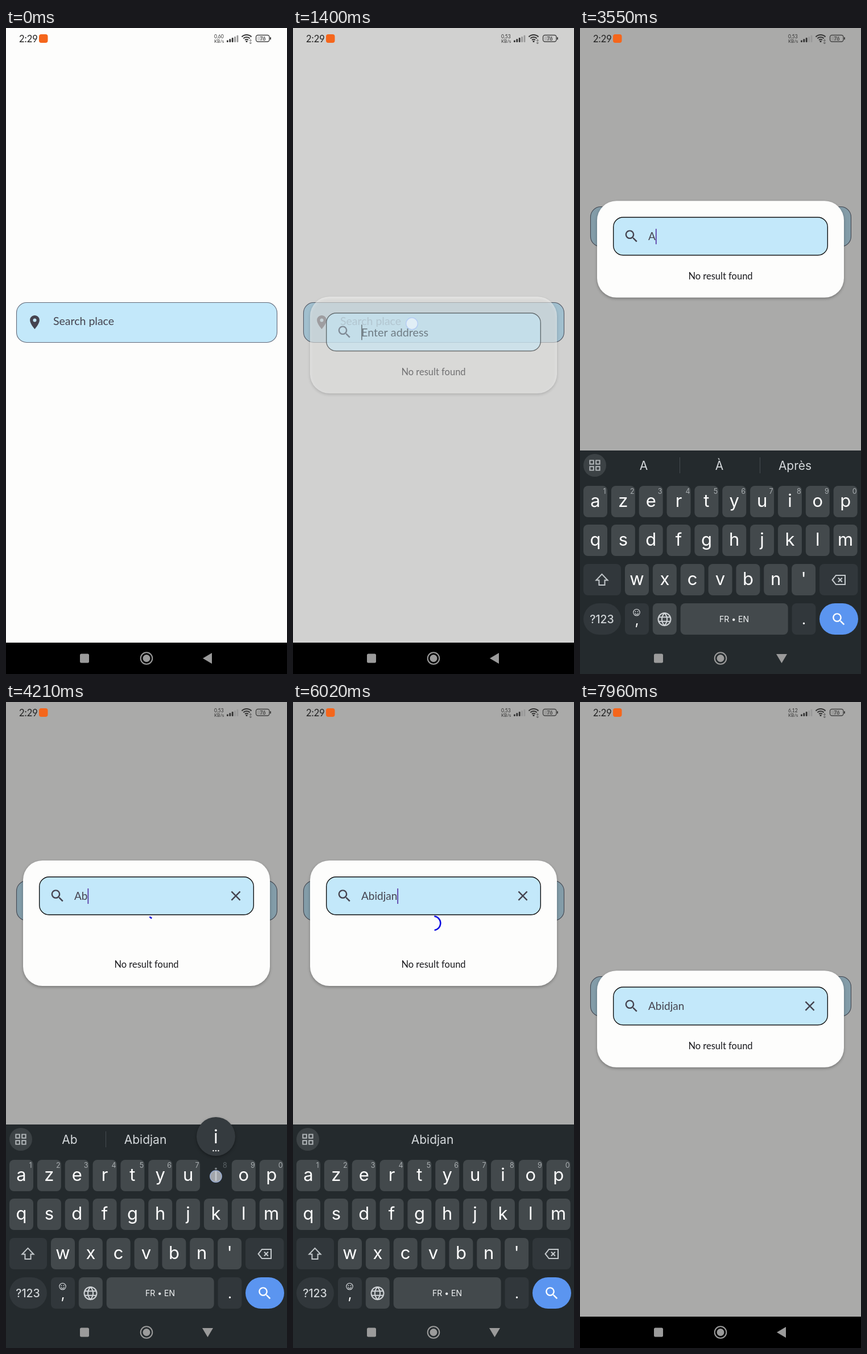
Recreate the animation shown at these times as an HTML page with a canvas. Size 494 by 1133 pixels, loop 8000 ms.

```html
<!DOCTYPE html>
<html lang="en">
<head>
<meta charset="utf-8">
<title>Place search</title>
<style>
html, body { margin: 0; width: 100%; height: 100%; overflow: hidden; background: #fdfdfc; }
canvas { display: block; }
</style>
</head>
<body>
<canvas id="stage" width="494" height="1133"></canvas>
<script>
const c = document.getElementById('stage').getContext('2d');
const LOOP = 8000, HAND = 'Lato, sans-serif', UI = 'Inter, sans-serif';
const INK = '#45434f', SKY = '#c3e8fa', PAPER = '#fdfdfc', KEY = '#43494c', DARK = '#31373b', BOARD = '#242a2d', ICON = '#b4b9bc';

// Time helpers
const ramp = (t, a, b) => Math.max(0, Math.min(1, (t - a) / (b - a)));
const ease = p => 1 - (1 - p) ** 3;
const smooth = p => p * p * (3 - 2 * p);

// Drawing helpers
function box(x, y, w, h, r, fill, stroke, lw = 1) {
  c.beginPath();
  c.roundRect(x, y, w, h, r);
  if (fill) { c.fillStyle = fill; c.fill(); }
  if (stroke) { c.strokeStyle = stroke; c.lineWidth = lw; c.stroke(); }
}
function disc(x, y, r, fill, stroke, lw = 1) {
  c.beginPath();
  c.arc(x, y, r, 0, 7);
  if (fill) { c.fillStyle = fill; c.fill(); }
  if (stroke) { c.strokeStyle = stroke; c.lineWidth = lw; c.stroke(); }
}
function txt(s, x, y, size, color, align = 'left', family = HAND, weight = 400) {
  c.font = `${weight} ${size}px ${family}`;
  c.textAlign = align;
  c.fillStyle = color;
  c.fillText(s, x, y);
}
// Icons live on a 24 x 24 grid and are centred on x, y
function icon(path, x, y, scale, color, lw) {
  c.save();
  c.translate(x, y);
  c.scale(scale, scale);
  c.translate(-12, -12);
  c.fillStyle = c.strokeStyle = color;
  c.lineWidth = lw;
  if (lw) c.stroke(path); else c.fill(path, 'evenodd');
  c.restore();
}
const ring = (x, y, r) => `M${x - r} ${y}a${r} ${r} 0 1 0 ${2 * r} 0a${r} ${r} 0 1 0 ${-2 * r} 0z`;
const P = s => new Path2D(s);
const PIN = P('M12 2C8.1 2 5 5.1 5 9c0 5.25 7 13 7 13s7-7.75 7-13c0-3.9-3.1-7-7-7z' + ring(12, 9, 2.5));
const LENS = P('M15.5 14h-.8l-.3-.3C15.4 12.6 16 11.1 16 9.5 16 5.9 13.1 3 9.5 3S3 5.9 3 9.5 5.9 16 9.5 16c1.6 0 3.1-.6 4.2-1.6l.3.3v.8l5 5 1.5-1.5zM9.5 14C7 14 5 12 5 9.5S7 5 9.5 5 14 7 14 9.5 12 14 9.5 14z');
const CROSS = P('M5.7 5.7l12.6 12.6M18.3 5.7L5.7 18.3');
const SHIFT = P('M12 3L21 12.5H16.5V20H7.5V12.5H3Z');
const ERASE = P('M8 5H22V19H8L2.5 12ZM11.5 9l6 6m0-6l-6 6');
const GLOBE = P(ring(12, 12, 9) + 'M3.5 9h17M3.5 15h17M12 3c-5 5.500-5 12.500 0 18c5-5.500 5-12.500 0-18');
const GRID = P('M4 4h6v6h-6zM14 4h6v6h-6zM4 14h6v6h-6zM14 14h6v6h-6z');
const CLIP = P('M4 4.500H20V21H4ZM8 4V7.500H16V4M8 11.500h8M8 14.500h8M8 17.500h5M10 3h4');
const STICKER = P('M5 3H19L21 5V14L14 21H5L3 19V5ZM21 14H14V21M8 9h1M15 8h2M7 13q3 4 7 1');
const PALETTE = P('M12 3c-5 0-9 4-9 9s4 9 9 9c.8 0 1.500-.7 1.500-1.500 0-.4-.2-.7-.4-1-.2-.3-.4-.6-.4-1 0-.8.7-1.500 1.500-1.500H16c2.800 0 5-2.200 5-5 0-4.400-4-8-9-8z'
  + ring(6.5, 11.5, 1.5) + ring(9.5, 7.5, 1.5) + ring(14.5, 7.5, 1.5) + ring(17.5, 11.5, 1.5));

// Typed letters: finger down, finger up
const TAPS = [['A', 3220, 3310], ['b', 3760, 3850], ['i', 4150, 4240], ['d', 4440, 4530], ['j', 4730, 4820], ['a', 4960, 5060], ['n', 5660, 5760]];
const PLACES = ['Alberta, Canada', 'Abia State, Nigeria', 'Abkhazia, Georgia', 'Stockholm County, Sweden'];
const ROWS = [['azertyuiop', 6, 803], ['qsdfghjklm', 6, 871], ["wxcvbn'", 79, 940]];
const KEYS = ROWS.flatMap(([s, x, y]) => [...s].map((ch, i) => ({ ch, x: x + i * 48.85, y })));

function state(t) {
  const done = TAPS.filter(k => t >= k[2]);
  const text = done.map(k => k[0]).join('');
  const since = t - (done.length ? done[done.length - 1][2] : 980);
  return {
    text,
    tap: TAPS.find(k => t >= k[1] && t < k[2]),
    kb: ease(ramp(t, 1420, 1560)) * (1 - smooth(ramp(t, 7500, 7760))),
    shade: ramp(t, 1310, 1480),
    cursor: t < 7420 && since % 1000 < 500,
    results: t >= 6380 && t < 7560,
    busy: t >= 3850 && t < 6380,
    focus: t >= 1450 && t < 2310,
    speed: t < 990 ? '0,60' : t < 6930 ? '0,53' : '6,12',
    turn: smooth(ramp(t, 1690, 1890)) - smooth(ramp(t, 7420, 7620))
  };
}

function page(s) {
  const y = 481 - 168 * s.kb;
  box(18.5, y + .5, 458, 70, 18, SKY, s.focus ? '#6750a4' : '#626978', s.focus ? 2 : 1.1);
  icon(PIN, 50.5, y + 35, 1.2, INK);
  txt('Search place', 83, y + 40, 19.5, INK);
  c.fillStyle = `rgba(0,0,0,${.33 * s.shade})`;
  c.fillRect(0, 0, 494, 1133);
}

function statusBar(s) {
  txt('2:29', 23, 25, 16.5, '#222');
  box(58, 11, 15.5, 15, 4, '#f5661c');
  txt(s.speed, 366, 18, 8.5, '#333');
  txt('KB/s', 366, 26, 8, '#333');
  for (let i = 0; i < 5; i++)
    box(388 + i * 4.4, 21.5 - i * 2.2, 2.8, 3.5 + i * 2.2, 1, i < 3 ? '#333' : '#999');
  c.strokeStyle = '#333';
  c.lineWidth = 2;
  for (const r of [4, 8, 12]) {
    c.beginPath();
    c.arc(423, 24, r, -2.36, -.78);
    c.stroke();
  }
  disc(423, 23.5, 1.6, '#333');
  txt('↕', 427, 26, 7, '#333', 'left', UI);
  box(439.5, 12.5, 23.5, 11.5, 3.5, null, '#444', 1.4);
  box(441.5, 14.5, 15, 7.5, 2, 'rgba(110,110,110,.25)');
  box(464, 16, 2, 4.5, 1, '#444');
  txt('76', 451.5, 21.5, 8.5, '#333', 'center');
}

function spinner(t, y) {
  const turns = (t - 2992) / 1332, p = turns % 1;
  const rad = Math.PI / 180;
  const head = 290 * smooth(Math.min(1, 2 * p)), tail = 290 * smooth(Math.max(0, 2 * p - 1));
  const base = 342 + 286 * p + 216 * (Math.floor(turns) - 1);
  c.beginPath();
  c.arc(247, y, 12.3, (base + tail) * rad, (base + Math.max(head, tail + 2)) * rad);
  c.strokeStyle = '#0808e0';
  c.lineWidth = 2.6;
  c.stroke();
}

function dialog(s, t) {
  if (!s.shade) return;
  const h = s.results ? 366 : s.busy ? 220 : 169.5;
  const y = 556 - 168 * s.kb - h / 2;
  c.save();
  c.globalAlpha = s.shade;
  c.shadowColor = 'rgba(0,0,0,.3)';
  c.shadowBlur = 5;
  c.shadowOffsetY = 2;
  box(30, y, 434, h, 34, PAPER);
  c.shadowColor = 'transparent';
  box(58.7, y + 28.7, 376.6, 66.6, 17, SKY, '#111', 1.4);
  icon(LENS, 90.5, y + 62, 1.2, INK);
  if (s.text) txt(s.text, 120, y + 69, 19, INK);
  else txt('Enter address', 120, y + 69.5, 19.8, '#26282c');
  if (s.cursor) {
    const x = 120 + (s.text && c.measureText(s.text).width);
    box(x, y + 49, 1.8, 27, 0, s.text ? '#5b3fa8' : '#333');
  }
  if (s.text.length > 1) icon(CROSS, 404, y + 62, 1.2, INK, 2);
  if (s.busy) spinner(t, y + 110);
  if (s.results) PLACES.forEach((name, i) => {
    const cy = y + 127 + i * 60.7;
    txt(name, 77, cy + 6, 16, '#18181c');
    disc(396.7, cy, 10.7, null, INK, 2.2);
  });
  else txt('No result found', 247, y + h - 32, 16.5, '#18181c', 'center');
  c.restore();
}

function gear(x, y) {
  disc(x, y, 6, null, ICON, 5);
  for (let i = 0; i < 8; i++) {
    c.save();
    c.translate(x, y);
    c.rotate(i * Math.PI / 4);
    box(-2.3, -10.6, 4.6, 4, 1, ICON);
    c.restore();
  }
}

function toolbar(s) {
  disc(26, 767, 20, '#3c4245');
  icon(GRID, 26, 767, 1.08, ICON, 1.8);
  if (!s.text) {
    icon(STICKER, 100, 767, 1.2, '#596064', 2);
    txt('GIF', 173, 773, 17, '#596064', 'center', UI, 800);
    icon(CLIP, 247, 767, 1.12, ICON, 2);
    gear(320, 767);
    icon(PALETTE, 393.5, 767, 1.2, ICON);
    return;
  }
  const words = s.text === 'A' ? ['A', 'À', 'Après'] : s.text === 'Abidjan' ? ['', s.text] : [s.text, 'Abidjan'];
  words.forEach((w, i) => txt(w, [112, 245, 378][i], 775, 21, '#d5d9dc', 'center', UI));
  if (words[0]) box(175, 753, 1, 28, 0, '#454b4f');
  if (words[2]) box(316, 753, 1, 28, 0, '#454b4f');
}

function keyboard(s) {
  if (!s.kb) return;
  c.save();
  c.beginPath();
  c.rect(0, 0, 494, 1078);
  c.clip();
  c.translate(0, 337 * (1 - s.kb));
  c.fillStyle = BOARD;
  c.fillRect(0, 741, 494, 392);
  toolbar(s);
  const upper = !s.text;
  const label = ch => upper ? ch.toUpperCase() : ch;
  const held = s.tap && KEYS.find(k => k.ch === s.tap[0].toLowerCase());
  KEYS.forEach((k, i) => {
    const down = k === held;
    if (!down) box(k.x, k.y, 42, 55, 8, KEY);
    txt(label(k.ch), k.x + 21, k.y + (upper ? 38.5 : 36.5), 31, down ? '#7d8387' : '#fff', 'center', UI);
    if (i < 10) txt((i + 1) % 10, k.x + 37, k.y + 14, 12.5, down ? '#596064' : '#a9aeb1', 'center', UI);
  });
  box(6, 940, 66, 55, 8, DARK);
  icon(SHIFT, 38.5, 968, 1.12, '#c3c8cb', upper ? 0 : 1.8);
  box(421, 940, 67.5, 55, 8, DARK);
  icon(ERASE, 454.5, 968, 1.15, '#c3c8cb', 1.8);
  box(6, 1009, 66, 55, 27.5, DARK);
  txt('?123', 38.5, 1043.5, 19.5, '#d0d4d7', 'center', UI, 500);
  box(79, 1009, 42, 55, 8, DARK);
  disc(99.5, 1025, 5.7, null, '#d0d4d7', 1.2);
  disc(97.5, 1023.5, .9, '#d0d4d7');
  disc(101.5, 1023.5, .9, '#d0d4d7');
  c.beginPath();
  c.arc(99.5, 1025.5, 3, .2, 2.9);
  c.stroke();
  txt(',', 100, 1047, 25, '#fff', 'center', UI);
  box(127.8, 1009, 42, 55, 8, KEY);
  icon(GLOBE, 148.5, 1037, 1.22, '#d0d4d7', 1.6);
  box(176.7, 1009, 189, 55, 8, KEY);
  txt('FR • EN', 271, 1041.500, 14, '#f2f4f5', 'center', UI);
  box(372.5, 1009, 42, 55, 8, DARK);
  txt('.', 393.5, 1046, 26, '#fff', 'center', UI);
  box(421, 1009, 68, 55, 27.5, '#5b95f0');
  icon(LENS, 455, 1037, 1.2, '#fff');
  if (held) {
    const x = Math.max(34, held.x + 21), y = held.y - 41;
    c.save();
    c.shadowColor = 'rgba(0,0,0,.35)';
    c.shadowBlur = 5;
    c.shadowOffsetY = 2;
    disc(x, y, 34, '#353b3f');
    c.restore();
    txt(label(held.ch), x, y + 12, 32, '#fff', 'center', UI);
    if ('ain'.includes(held.ch)) for (const d of [-4.5, 0, 4.5]) disc(x + d, y + 25, 1.2, '#fff');
    touch(held.x + 21, held.y + 29, 1);
  }
  c.restore();
}

function touch(x, y, alpha) {
  c.save();
  c.globalAlpha = alpha;
  disc(x, y, 10.3, 'rgba(245,248,255,.6)', 'rgba(170,195,245,.75)', 1.3);
  c.restore();
}

function navBar(s) {
  c.fillStyle = s.kb ? BOARD : '#000';
  c.fillRect(0, 1078, 494, 55);
  const grey = '#9b9b9b';
  box(130, 1097.5, 16, 16, 2.5, grey);
  disc(247, 1105.5, 10.3, null, grey, 2);
  disc(247, 1105.5, 6.5, grey);
  c.save();
  c.translate(354.5, 1105.5);
  c.rotate(-s.turn * Math.PI / 2);
  c.fillStyle = grey;
  c.fill(P('M-8.500 0L7.500-9.500V9.500Z'));
  c.restore();
}

function draw(now) {
  const t = now % LOOP, s = state(t);
  c.fillStyle = PAPER;
  c.fillRect(0, 0, 494, 1133);
  page(s);
  statusBar(s);
  dialog(s, t);
  keyboard(s);
  navBar(s);
  const finger = ramp(t, 1180, 1220) * (1 - .7 * ramp(t, 1460, 1570)) * (1 - ramp(t, 1570, 1690));
  if (finger) touch(209, 518.5, finger);
}

const start = performance.now();
function tick() {
  draw(performance.now() - start);
  requestAnimationFrame(tick);
}
tick();
</script>
</body>
</html>
```
